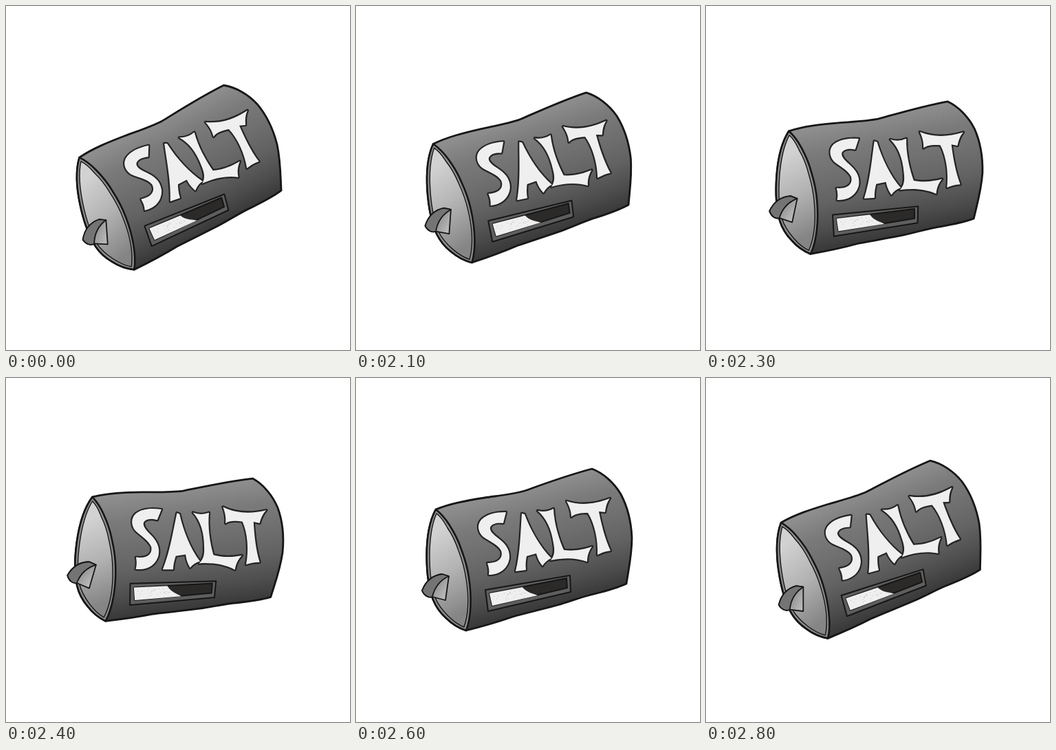
Animation, 500 px wide and 500 px high, one loop 2.9 s. Source, as an HTML page with a canvas:

```html
<!DOCTYPE html>
<html lang="en">
<head>
<meta charset="utf-8">
<title>Salt tin</title>
<style>
html, body { margin: 0; width: 100%; height: 100%; overflow: hidden; background: #fff; }
canvas { display: block; width: 500px; height: 500px; }
</style>
</head>
<body>
<canvas id="stage" width="500" height="500"></canvas>
<script>
const ctx = document.getElementById('stage').getContext('2d');
const LOOP = 2900, HOLD = 2000, STEP = 100;
const DRAWN_AT = 12; // tilt, in degrees, at which the paths below are laid out
const INK = '#161616';

const body = new Path2D(`M116 191 C138 182 162 178 187 174 C207 171 227 169 245 164
  C276 153 308 141 343 132 C359 138 375 152 385 169 C394 186 400 209 401 232
  C401 258 396 279 393 299 C378 306 362 310 346 314 C328 318 311 325 293 330
  C271 336 250 341 228 347 C205 355 184 361 160 367
  C148 363 139 357 131 349 C122 341 116 332 112 322 C101 292 97 226 116 191 Z`);
const face = new Path2D(`M116 191 C126 199 131 206 136 214 C143 225 149 237 153 249
  C158 262 162 276 164 290 C168 316 168 347 160 367 C148 363 139 357 131 349
  C122 341 116 332 112 322 C101 292 97 226 116 191 Z`);
const plate = new Path2D(`M117 197 C126 204 129 211 133 218 C140 228 145 239 149 251
  C154 264 158 278 160 292 C164 316 164 342 157 362 C147 358 141 353 134 346
  C126 338 119 329 115 319 C105 290 103 229 117 197 Z`);
const handle = new Path2D('M96 309 C101 296 111 287 125 285 L135 288 L130 323 L111 318 C105 320 99 316 96 309 Z');
const handleSide = new Path2D('M96 309 C101 296 111 287 125 285 L135 288 C122 294 114 305 111 318 C105 320 99 316 96 309 Z');

const frame = new Path2D('M188 308 L311 287 L312 311 L192 339 Z');
const slot = new Path2D('M194 313 L306 291 L307 305 L198 331 Z');
const salt = new Path2D('M194 313 L242 304 C248 312 257 313 264 316 L198 331 Z');

const letters = [
  // S
  `M218 195 C202 195 190 198 182 206 C175 214 178 225 185 231 C195 238 206 242 211 251
   C214 260 209 269 191 269 C193 275 194 280 193 286 C210 286 221 276 223 262
   C224 248 216 240 207 233 C199 227 194 222 195 217 C198 211 206 210 214 211 Z`,
  // A, with its counter
  `M241 197 C239 224 239 252 232 281 L247 279 C246 271 247 265 248 259 L262 255
   C264 263 267 268 271 273 C274 268 279 264 284 262 C268 246 254 222 245 198 Z
   M247 223 L247 247 L258 244 Z`,
  // L
  `M264 193 Q276 196 287 190 C288 212 295 234 302 250 C318 252 331 249 343 245
   C338 252 336 259 336 267 C320 261 302 261 283 265 C289 258 289 250 287 240
   C284 220 277 204 264 193 Z`,
  // T
  `M306 179 C328 186 348 183 369 175 C364 182 363 188 362 195 L353 194
   C357 214 362 234 370 251 C362 252 357 254 351 257 C352 236 347 212 337 196
   C327 196 318 197 313 202 C313 194 310 186 306 179 Z`
].map(d => new Path2D(d));

function shade(x0, y0, x1, y1, ...tones) {
  const g = ctx.createLinearGradient(x0, y0, x1, y1);
  tones.forEach((c, i) => g.addColorStop(i / (tones.length - 1), c));
  return g;
}

const bodyFill = shade(226, 165, 274, 342, '#8e8e8e', '#7a7a7a', '#6f6f6f', '#626262', '#4d4d4d', '#333');
const faceFill = shade(108, 228, 168, 334, '#d2d2d2', '#b2b2b2', '#858585');
const handleFill = shade(110, 300, 134, 316, '#888', '#c0c0c0');

function shape(path, fill, width, ink = INK) {
  ctx.fillStyle = fill;
  ctx.fill(path);
  if (!width) return;
  ctx.strokeStyle = ink;
  ctx.lineWidth = width;
  ctx.stroke(path);
}

function grains() {
  ctx.save();
  ctx.clip(salt);
  ctx.fillStyle = '#bdbdbd';
  let seed = 7;
  const rnd = () => (seed = seed * 16807 % 2147483647) / 2147483647;
  for (let i = 0; i < 36; i++) {
    const x = rnd() * 66;
    ctx.fillRect(196 + x, 313 - x * 0.2 + rnd() * 17, 1, 1);
  }
  ctx.restore();
}

function drawTin() {
  shape(body, bodyFill, 2.8);
  shape(face, '#8d8d8d', 2.6);
  shape(plate, faceFill, 1.4);
  shape(handle, handleFill, 1.8);
  shape(handleSide, '#747474', 1.8);

  shape(frame, '#5e5e5e', 2);
  shape(slot, '#2b2a29', 2);
  shape(salt, '#efefef', 0);
  grains();

  ctx.strokeStyle = '#242424';
  ctx.lineWidth = 4.4;
  for (const l of letters) ctx.stroke(l);
  for (const l of letters) shape(l, '#efefef', 0);
}

// Tips over in 4 degree steps and back again
function angleAt(t) {
  if (t < HOLD) return 0;
  const i = Math.floor((t - HOLD) / STEP);
  return 4 * (5 - Math.abs(4 - i));
}

function render(now) {
  const tilt = angleAt(now % LOOP) - DRAWN_AT;
  ctx.setTransform(1, 0, 0, 1, 0, 0);
  ctx.fillStyle = '#fff';
  ctx.fillRect(0, 0, 500, 500);
  ctx.translate(250, 250);
  ctx.rotate(tilt * Math.PI / 180);
  ctx.translate(-250, -250);
  drawTin();
}

ctx.lineJoin = 'round';
const start = performance.now();
function tick() {
  render(performance.now() - start);
  requestAnimationFrame(tick);
}
tick();
</script>
</body>
</html>
```
